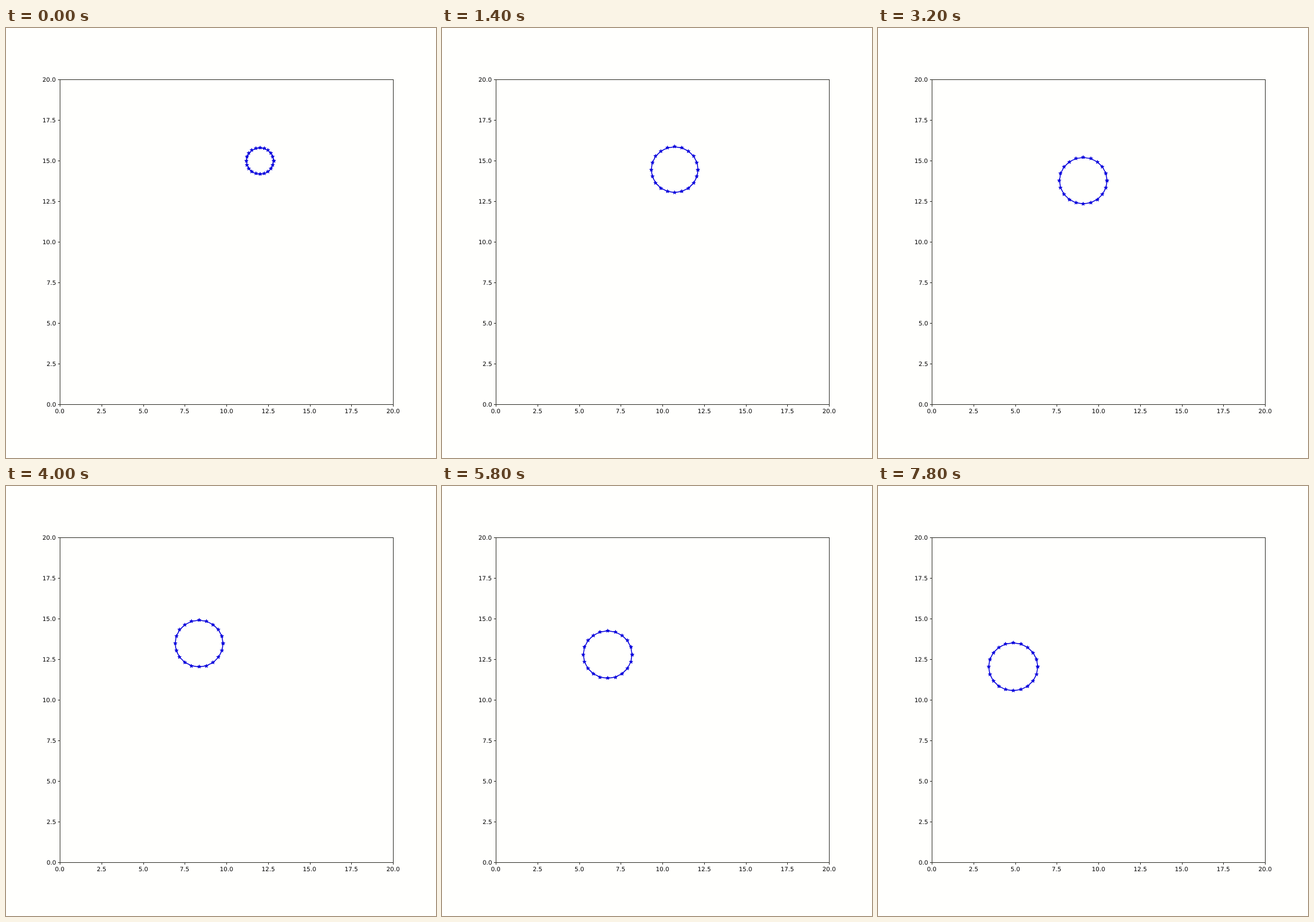
Animation of 720x720 px, one loop 8 s. Source, as an HTML page with a canvas:

```html
<!DOCTYPE html>
<html lang="en">
<head>
<meta charset="utf-8">
<title>Drifting circle</title>
<style>
  html, body { margin: 0; width: 100%; height: 100%; overflow: hidden; background: #fffffd; }
  canvas { display: block; }
</style>
</head>
<body>
<canvas id="plot" width="720" height="720"></canvas>
<script>
const ctx = document.getElementById('plot').getContext('2d');
const STEP_MS = 200, STEPS = 40, POINTS = 20;
const BACKGROUND = '#fffffd', AXIS = '#30302a', BLUE = '#0600dc';

const toX = v => 90 + 27.9 * v;
const toY = v => 630 - 27.18 * v;
const crisp = p => Math.round(p) + 0.5;

function line(x1, y1, x2, y2) {
  ctx.beginPath();
  ctx.moveTo(x1, y1);
  ctx.lineTo(x2, y2);
  ctx.stroke();
}

function drawAxes() {
  const left = crisp(toX(0)), right = crisp(toX(20));
  const top = crisp(toY(20)), bottom = crisp(toY(0));
  ctx.strokeStyle = AXIS;
  ctx.lineWidth = 1;
  ctx.lineJoin = 'miter';
  ctx.strokeRect(left, top, right - left, bottom - top);
  ctx.fillStyle = '#000';
  ctx.font = '10px "DejaVu Sans", sans-serif';
  ctx.textRendering = 'geometricPrecision';
  for (let v = 0; v <= 20; v += 2.5) {
    const x = crisp(toX(v)), y = crisp(toY(v)), label = v.toFixed(1);
    const width = ctx.measureText(label).width;
    line(x, bottom, x, bottom + 3.5);
    line(left, y, left - 3.5, y);
    ctx.fillText(label, Math.round(toX(v) - width / 2), 645);
    ctx.fillText(label, Math.round(83.5 - width), Math.round(toY(v)) + 4);
  }
}

function drawStar(x, y) {
  ctx.beginPath();
  for (let i = 0; i < 10; i++) {
    const radius = i % 2 ? 1.146 : 3, angle = i * Math.PI / 5;
    ctx.lineTo(x + radius * Math.sin(angle), y - radius * Math.cos(angle));
  }
  ctx.closePath();
  ctx.fill();
  ctx.stroke();
}

function drawCircle(step) {
  const cx = 12 - 0.1828 * step, cy = 15 - 0.0754 * step;
  const radius = step === 0 ? 0.815 : Math.min(1.475, 1.39 + 0.0025 * step);
  const points = Array.from({ length: POINTS + 1 }, (_, i) => {
    const angle = i * 2 * Math.PI / POINTS;
    return [toX(cx + radius * Math.cos(angle)), toY(cy + radius * Math.sin(angle))];
  });
  ctx.strokeStyle = ctx.fillStyle = BLUE;
  ctx.lineJoin = 'round';
  ctx.lineWidth = 1.5;
  ctx.beginPath();
  points.forEach(([x, y]) => ctx.lineTo(x + 0.5, y + 0.5));
  ctx.stroke();
  ctx.lineJoin = 'bevel';
  ctx.lineWidth = 1;
  points.forEach(([x, y]) => drawStar(crisp(x), crisp(y)));
}

function render() {
  ctx.fillStyle = BACKGROUND;
  ctx.fillRect(0, 0, 720, 720);
  drawAxes();
  drawCircle(Math.floor((performance.now() - start) / STEP_MS) % STEPS);
  requestAnimationFrame(render);
}

const start = performance.now();
render();
</script>
</body>
</html>
```
